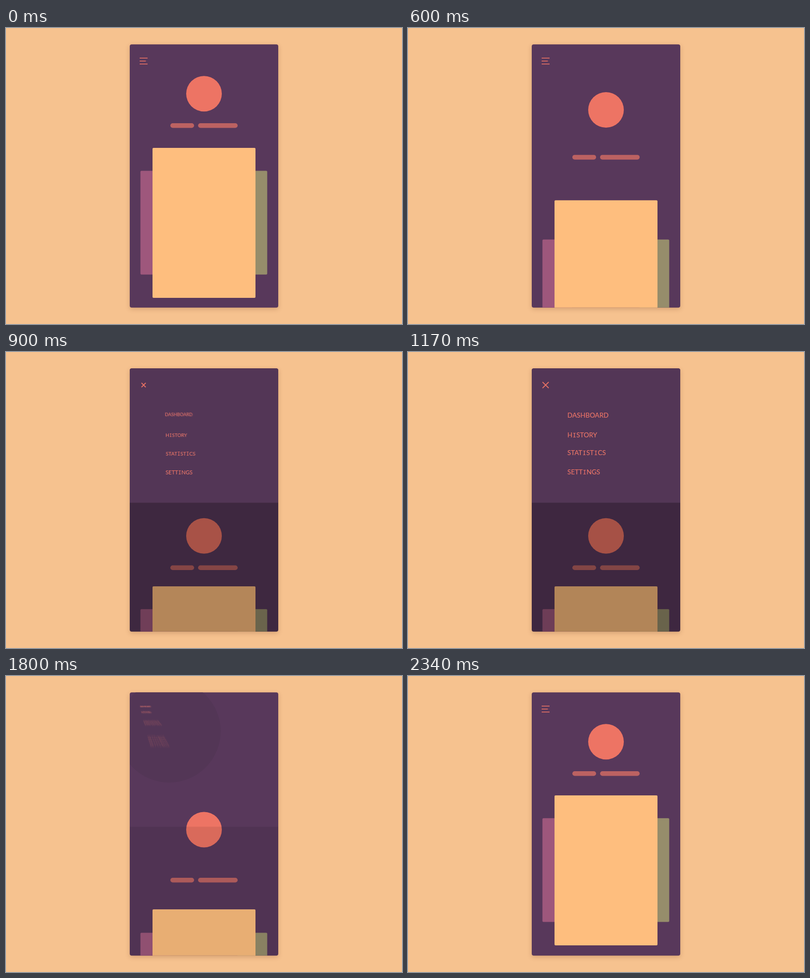
Animation of 800x600 px, one loop 2370 ms. Source, as an HTML page with a canvas:

```html
<!DOCTYPE html>
<html lang="en">
<head>
<meta charset="utf-8">
<title>Menu reveal</title>
<style>
html, body { margin: 0; width: 100%; height: 100%; overflow: hidden; background: #f6c28f; }
canvas { display: block; }
</style>
</head>
<body>
<canvas id="stage" width="800" height="600"></canvas>
<script>
const LOOP = 2370, STEP = 30, HALF = 1500;
const BASE = '#58385b', CORAL = '#ed7464';
const SIZE = 13.4, SAMPLES = 16, SHUTTER = 15;

const stage = document.getElementById('stage');
const ctx = stage.getContext('2d');
const blurLayer = document.createElement('canvas');
blurLayer.width = 800;
blurLayer.height = 600;
const blur = blurLayer.getContext('2d');

const clamp = u => Math.max(0, Math.min(1, u));
const span = (t, start, length) => clamp((t - start) / length);
const cubic = u => u < .5 ? 4 * u ** 3 : 1 - 4 * (1 - u) ** 3;
const quad = u => u < .5 ? 2 * u * u : 1 - 2 * (1 - u) ** 2;
const backOut = u => 1 + 1.6 * (u - 1) ** 3 + .6 * (u - 1) ** 2;

// Goes 0 to 1 while opening and back to 0 while closing.
const toggle = (t, ease, inAt, inFor, outAt, outFor) =>
  t < HALF ? ease(span(t, inAt, inFor)) : 1 - ease(span(t, outAt, outFor));

const items = [
  { text: 'DASHBOARD', y: 128, from: 61, line: 16 },
  { text: 'HISTORY', y: 168, from: 67, line: 12.5 },
  { text: 'STATISTICS', y: 204.5, from: 73, line: 16 },
  { text: 'SETTINGS', y: 243, from: 73, line: 0 }
];

function box(c, x, y, w, h, r, fill) {
  c.fillStyle = fill;
  c.beginPath();
  c.roundRect(x, y, w, h, r);
  c.fill();
}

function disc(x, y, r, fill) {
  ctx.fillStyle = fill;
  ctx.beginPath();
  ctx.arc(x, y, r, 0, Math.PI * 2);
  ctx.fill();
}

// Vertical offset of a part: slides down, returns, then rises slightly past its rest.
function drop(t, distance, inAt, outAt) {
  const rise = 2 * Math.sin(Math.PI * span(t, outAt + 360, 260));
  return distance * toggle(t, cubic, inAt, 453, outAt, 320) - rise;
}

const itemPos = (t, i) => toggle(t, t < HALF ? backOut : cubic,
  649 + 29 * (3 - i), 290, 1563 + 27 * i, 280);

function itemScale(t, i, p) {
  const bySpace = .2 + Math.sqrt(p) * (.5 + .3 * p);
  const byTime = .38 + .62 * span(t, 649 + 29 * (3 - i), 350);
  return Math.min(1, bySpace, byTime);
}

// The capital I has serifs, so it is set in a monospaced face.
function drawWord(c, word) {
  let x = 0;
  for (const part of word.split(/(I)/)) {
    c.font = SIZE + (part === 'I' ? 'px "Noto Sans Mono", monospace' : 'px Lato, sans-serif');
    c.fillText(part, x, SIZE * .36);
    x += c.measureText(part).width;
  }
}

function drawItem(t, item, i) {
  if (itemPos(t, i) <= 0) {
    if (item.line) box(ctx, 270, item.from - .8, item.line, 1.6, 0, CORAL);
    return;
  }
  blur.globalCompositeOperation = 'lighter';
  blur.globalAlpha = 1 / SAMPLES;
  blur.fillStyle = CORAL;
  for (let k = 0; k < SAMPLES; k++) {
    const at = t + SHUTTER * ((k + .5) / SAMPLES - .5);
    const p = itemPos(at, i), s = itemScale(at, i, p);
    blur.save();
    blur.translate(270 + 52 * p, item.from + (item.y - item.from) * p);
    blur.scale(s, s);
    drawWord(blur, item.text);
    blur.restore();
  }
}

function drawCross(t) {
  const r = 6.2 * toggle(t, cubic, 670, 400, 1520, 180);
  if (!r) return;
  ctx.strokeStyle = CORAL;
  ctx.lineWidth = 1.8;
  ctx.beginPath();
  for (const d of [-r, r]) {
    ctx.moveTo(278 - r, 67 - d);
    ctx.lineTo(278 + r, 67 + d);
  }
  ctx.stroke();
}

function drawProfile(t) {
  disc(400, 133.2 + drop(t, 239.5, 453, 1672), 36, CORAL);

  const barY = 193 + drop(t, 239.5, 416, 1707);
  box(ctx, 332, barY, 48, 9.5, 4.75, '#bc6262');
  box(ctx, 388, barY, 80, 9.5, 4.75, '#bc6262');

  const sideY = 289.4 + drop(t, 231.8, 357, 1772);
  box(ctx, 271.6, sideY, 60, 210.3, 2, '#9e577c');
  box(ctx, 467.7, sideY, 60, 210.3, 2, '#968d6b');
  box(ctx, 296, 242.9 + drop(t, 232, 380, 1759), 208, 304, 2, '#febe7e');
}

function draw(t) {
  ctx.fillStyle = '#f6c28f';
  ctx.fillRect(0, 0, 800, 600);

  ctx.save();
  ctx.shadowColor = 'rgba(90, 40, 20, .22)';
  ctx.shadowBlur = 10;
  ctx.shadowOffsetY = 3;
  box(ctx, 250, 33.3, 300, 533.4, 4, BASE);
  ctx.restore();

  ctx.save();
  ctx.beginPath();
  ctx.roundRect(250, 33.3, 300, 533.4, 4);
  ctx.clip();

  const grow = toggle(t, cubic, 591, 300, 1642, 300);
  if (grow) {
    ctx.save();
    ctx.beginPath();
    ctx.rect(250, 33, 300, 272.5);
    ctx.clip();
    disc(278 + 122 * grow, 67 + 106 * grow, 245 * grow, '#533656');
    ctx.restore();
  }

  drawProfile(t);

  const shade = .3 * toggle(t, quad, 650, 280, 1650, 240);
  ctx.fillStyle = `rgba(0, 0, 0, ${shade})`;
  ctx.fillRect(250, 305.5, 300, 262);

  blur.clearRect(0, 0, 800, 600);
  items.forEach((item, i) => drawItem(t, item, i));
  ctx.drawImage(blurLayer, 0, 0);
  drawCross(t);
  ctx.restore();
}

function frame() {
  const t = performance.now() % LOOP;
  draw(Math.floor(t / STEP) * STEP);
  requestAnimationFrame(frame);
}
frame();
</script>
</body>
</html>
```
